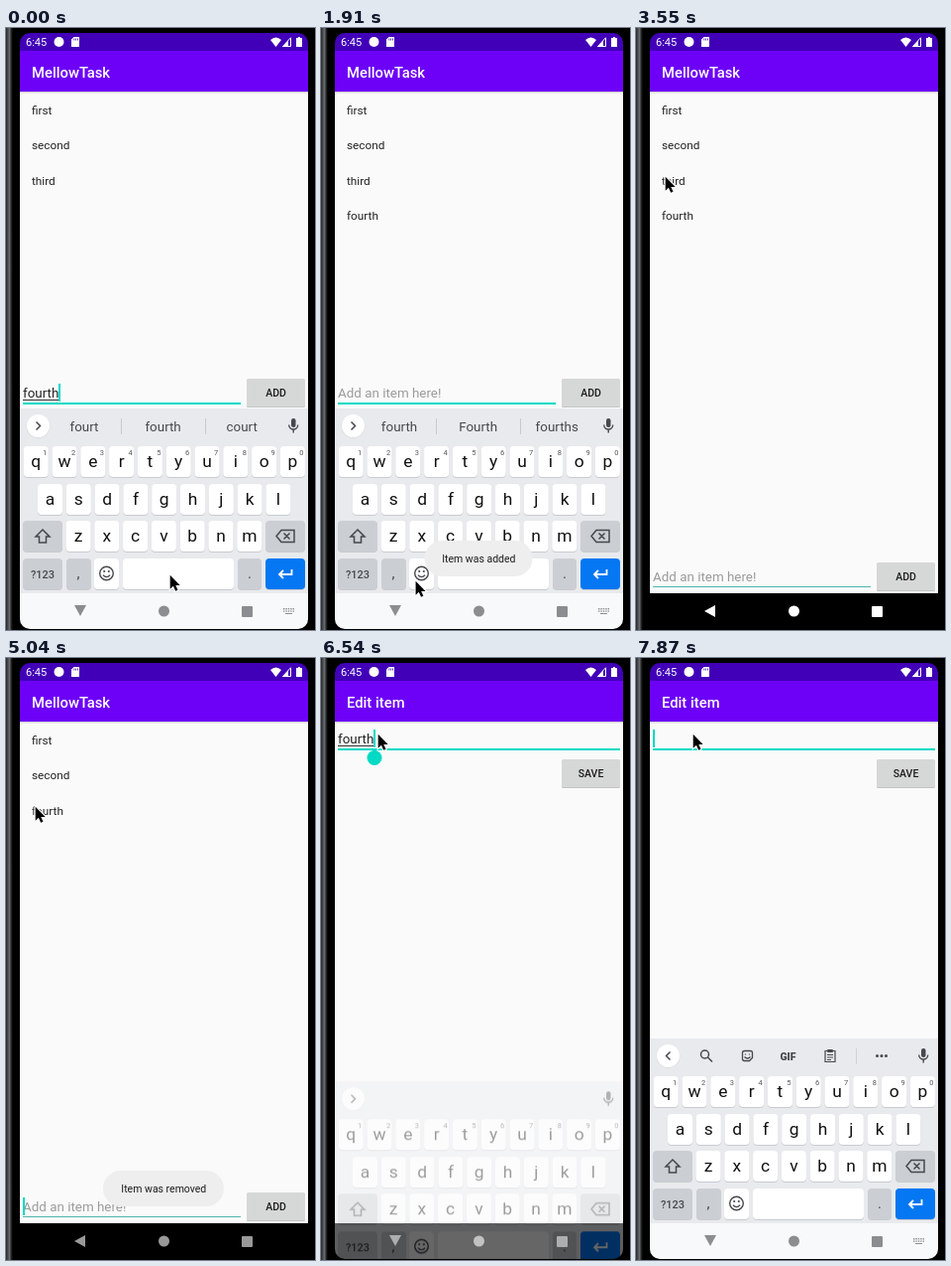
Recreate the animation shown at these times as an HTML page with a canvas. Size 312 by 606 pixels, loop 8000 ms.

```html
<!DOCTYPE html>
<html lang="en">
<head>
<meta charset="utf-8">
<title>To-do demo</title>
<style>
html, body { margin: 0; width: 312px; height: 606px; overflow: hidden; background: #000; }
canvas { display: block; width: 312px; height: 606px; }
</style>
</head>
<body>
<script>
const W = 312, H = 606, LOOP = 8000, STEP = 148.5;
const TEAL = '#03dac5', GREY = '#cbced3', INK = '#45484c';
const dpr = window.devicePixelRatio || 1;

function surface() {
  const canvas = document.createElement('canvas');
  canvas.width = W * dpr;
  canvas.height = H * dpr;
  const ctx = canvas.getContext('2d');
  ctx.scale(dpr, dpr);
  return ctx;
}
const main = surface(), buffer = surface();
document.body.append(main.canvas);
let c = main;

const clamp = v => Math.max(0, Math.min(1, v));

function box(x, y, w, h, color, r = 0) {
  c.fillStyle = color;
  c.beginPath();
  c.roundRect(x, y, w, h, r);
  c.fill();
}
function dot(x, y, r, color) {
  box(x - r, y - r, 2 * r, 2 * r, color, r);
}
function text(s, x, y, size, color = '#222', weight = 400, align = 'left') {
  c.font = `${weight} ${size}px Roboto, sans-serif`;
  c.fillStyle = color;
  c.textAlign = align;
  c.fillText(s, x, y);
  return c.measureText(s).width;
}
function fill(d, x, y, color) {
  c.save();
  c.translate(x, y);
  c.fillStyle = color;
  c.fill(new Path2D(d));
  c.restore();
}
function line(d, x, y, color, width = 1.5) {
  c.save();
  c.translate(x, y);
  c.strokeStyle = color;
  c.lineWidth = width;
  c.stroke(new Path2D(d));
  c.restore();
}
// Draws a group off screen, then blends it as one picture.
function layer(alpha, dy, draw) {
  if (alpha <= 0) return;
  buffer.clearRect(0, 0, W, H);
  c = buffer;
  draw();
  c = main;
  c.globalAlpha = alpha;
  c.drawImage(buffer.canvas, 0, dy, W, H);
  c.globalAlpha = 1;
}

function device() {
  const edge = c.createLinearGradient(0, 0, 7, 0);
  edge.addColorStop(0, '#26282a');
  edge.addColorStop(0.5, '#686b6e');
  edge.addColorStop(0.8, '#1c1d1e');
  edge.addColorStop(1, '#000');
  box(0, 0, W, H, '#000');
  box(0, 0, 7, H, edge);
}

function page(title) {
  box(14, 23, 291, 547, '#fafafa');
  box(14, 64, 291, 1, '#d4d4d6');
  box(14, 65, 291, 1, '#ececee');
  box(14, 5, 291, 18, '#4100b8');
  box(14, 23, 291, 41, '#6d00f7');
  text('6:45', 20, 18, 11, '#fff');
  dot(53.5, 14, 5, '#fff');
  fill('M2.5 0H8V10H0V2.5Z', 66, 9, '#fff');
  for (let x = 68.5; x < 73; x += 1.8) box(x, 10.5, 0.8, 2, '#4100b8');
  fill('M0 3Q5.5-2 11 3L5.5 10Z', 267, 9, '#fff');
  line('M.5 9.5L8.5 .8V9.5Z', 279, 9, '#fff', 1);
  fill('M0 10L6 3.5V10Z', 279, 9, '#fff');
  fill('M0 1H2V0H4V1H6V10H0Z', 293, 9, '#fff');
  text(title, 26, 49.7, 14.8, '#fff', 500);
}

function navBar(background, tone, down) {
  box(14, 569, 291, 37, background);
  fill(down ? 'M-6-6H6L0 5Z' : 'M5-6V6L-6 0Z', 75, 587, tone);
  dot(159.5, 587, 5.5, tone);
  box(238, 582, 11, 11, tone, 1);
}

function button(label, y, pressed) {
  box(243, y + 1, 59, 28, '#c3c5c4', 1.5);
  box(243, y, 59, 28, pressed ? '#cbcdcc' : '#d6d8d7', 1.5);
  text(label, 272.5, y + 18, 10.5, '#1c1c1c', 500, 'center');
}

function field({ value, hint, y, right, caret, active, handle }) {
  const width = value ? text(value, 17, y + 4, 13.4) : 0;
  if (!value && hint) text(hint, 17, y + 4, 13.4, '#9b9b9b');
  if (value && active) box(17, y + 6, width, 1, '#333');
  box(17, y + 9, right - 17, active ? 2 : 1, active ? TEAL : hint ? '#4fb5ae' : '#a2a2a2');
  if (caret) box(17 + Math.round(width), y - 10, 2, 18, TEAL);
  if (handle) {
    dot(54, y + 18.5, 7.5, TEAL);
    fill('M0-8.5L5-4H-5Z', 54, y + 18.5, TEAL);
  }
}

function key(x, y, w, color = '#fff') {
  box(x, y + 1, w, 31, '#c8cbcf', 4);
  box(x, y, w, 31, color, 4);
}
function letters(row, firstX, y, digits) {
  [...row].forEach((ch, i) => {
    const x = firstX + i * 28.8;
    key(x - 12.5, y, 25);
    text(ch, x, y + 20.5, 17.4, '#111', 400, 'center');
    if (digits) text((i + 1) % 10, x + 9, y + 8.5, 7.5, '#555', 400, 'center');
  });
}

function toolStrip() {
  line('M2-4L-2 0L2 4', 32.5, 400.5, INK);
  line('M3.5-1A4 4 0 1 1-4.5-1A4 4 0 1 1 3.5-1M2.5 2L7 6.5', 70, 400, INK);
  line('M-3-5H3Q5-5 5-3V2L2 5H-3Q-5 5-5 3V-3Q-5-5-3-5M-2-2V-1M2-2V-1M-3 1Q0 4 3 1', 112.5, 400.5, INK, 1.3);
  text('GIF', 153.5, 404.5, 10.5, INK, 900, 'center');
  line('M-5-5H5V6H-5ZM-3-1H3M-3 1.5H3M-3 4H1', 196, 400.5, INK, 1.2);
  box(193, 394, 6, 3, INK, 1);
  box(222, 393, 1, 16, '#cfd2d6');
  for (const x of [243.5, 248, 252.5]) dot(x, 400.5, 1.5, INK);
}

function keyboard(words) {
  const navTone = '#8b8d90';
  box(14, 383, 291, 187, '#e8eaed');
  navBar('#f8f9fa', navTone, true);
  for (let y = 0; y < 2; y++)
    for (let x = 0; x < 5; x++) box(280 + x * 2.4, 584 + y * 2.4, 1.4, 1.4, navTone);
  box(282, 589, 7, 1, navTone);

  dot(32.5, 401, 11.8, '#d5d7da');
  dot(32.5, 400.5, 11.5, '#fff');
  if (words === 'tools') toolStrip();
  else {
    line('M-2-4L2 0L-2 4', 32.5, 400.5, INK);
    if (words) {
      words.split(' ').forEach((w, i) => text(w, 79 + i * 79.6, 406, 13.4, INK, 400, 'center'));
      box(116, 393, 1, 16, '#c8cbcf');
      box(201, 393, 1, 16, '#c8cbcf');
    }
  }
  box(288, 393, 4.5, 9, INK, 2.2);
  line('M-4.5-1A4.5 4.5 0 0 0 4.5-1M0 3.5V7', 290.2, 400.5, INK, 1.4);

  letters('qwertyuiop', 30.2, 421, true);
  letters('asdfghjkl', 44.5, 459);
  letters('zxcvbnm', 73, 496);
  key(17, 496, 40, GREY);
  line('M0-7L7 0H3.5V6H-3.5V0H-7Z', 37, 512, INK);
  key(262, 496, 40, GREY);
  line('M-9 0L-4-6H9V6H-4ZM-1.5-3L4.5 3M4.5-3L-1.5 3', 282, 511.5, INK);
  key(17, 534, 40, GREY);
  text('?123', 37, 553.5, 11, INK, 500, 'center');
  key(61, 534, 25, GREY);
  text(',', 73, 554, 15, INK, 400, 'center');
  key(89, 534, 25);
  line('M6.8 0A6.8 6.8 0 1 1-6.8 0A6.8 6.8 0 1 1 6.8 0M-3.6 1.6Q0 5.6 3.6 1.6', 101.5, 549, INK, 1.4);
  dot(99.2, 547, 1.1, INK);
  dot(103.8, 547, 1.1, INK);
  key(118, 534, 112);
  key(234, 534, 24, GREY);
  text('.', 246, 554, 15, INK, 400, 'center');
  key(262, 534, 40, '#0577f2');
  line('M6.5-4V1H-5.5M-2-3L-6 1L-2 5', 282, 549, '#fff', 1.8);
}

function toast(message, halfWidth, alpha) {
  layer(alpha, 0, () => {
    box(159 - halfWidth, 516, 2 * halfWidth, 36, '#eeeeee', 18);
    text(message, 159.3, 537.5, 10.5, '#1c1c1c', 400, 'center');
  });
}

// Pointer stops: time in steps, x, y.
const stops = [[1, 165, 550], [6, 249, 367], [9, 249, 367], [14, 77, 578], [17, 77, 578],
  [23, 29, 149], [37, 29, 149], [39, 45, 106], [42, 57, 76]];
function pointer(n) {
  let i = stops.findIndex(s => s[0] > n);
  if (i < 0) i = stops.length - 1;
  const b = stops[i], a = stops[Math.max(0, i - 1)];
  const k = clamp((n - a[0]) / (b[0] - a[0] || 1)), e = k * k * (3 - 2 * k);
  const x = a[1] + (b[1] - a[1]) * e + 0.7, y = a[2] + (b[2] - a[2]) * e + 0.7;
  const arrow = 'M0 0V14L3.2 11L5.5 16L7.8 15L5.6 10.2H10Z';
  line(arrow, x, y, '#fff', 2.2);
  fill(arrow, x, y, '#000');
}

const blink = (n, start) => ((n - start) % 6.734 + 6.734) % 6.734 < 3.367;
const fade = (n, start, rise, end, fall) => Math.min(clamp((n - start) / rise), clamp((end - n) / fall));

function listPage(n, covered) {
  const added = n >= 7, typing = n <= 14;
  page('MellowTask');
  const items = ['first', 'second'];
  if (n < 29) items.push('third');
  if (added) items.push('fourth');
  items.forEach((s, i) => text(s, 26, Math.floor(87 + i * 35.6), 11.8));
  const y = typing ? 368 : 553;
  field({ value: added ? '' : 'fourth', hint: 'Add an item here!', y, right: 237,
    caret: n < 3 || blink(n, 27), active: typing });
  button('ADD', y - 15, n >= 6 && n < 10);
  const tone = Math.round(153 + 102 * fade(n, 15, 2, 34, 2));
  navBar('#000', `rgb(${tone},${tone},${tone})`, covered);
}

// Text left in the edit field and its suggestions after each deletion.
const edits = [[0, 'fourth', 'fourth Fourth fourths'], [49, 'fourt', 'fourt fourth court'],
  [50, 'four', 'four Four for'], [51, 'fou', 'fou you for'], [52, 'f', 'f for of'], [53, '', 'tools']];

function editPage(n, value, covered) {
  page('Edit item');
  const focused = n >= 43;
  field({ value, y: 82, right: 302, active: focused,
    caret: focused && (n >= 49 || blink(n, 43)), handle: focused && n < 49 });
  button('SAVE', 102);
  navBar('#000', '#999', covered);
}

function render(n) {
  const [, value, words] = edits.findLast(e => e[0] <= n);
  const opened = clamp((n - 35) / 3);
  const shown = n < 20 ? clamp(1 - (n - 14) / 2) : clamp((n - 43) / 2.5);
  const strip = n < 7 ? 'fourt fourth court' : n < 14 ? 'fourth Fourth fourths' : n < 45 ? '' : words;

  device();
  c.save();
  c.beginPath();
  c.roundRect(14, 5, 291, 600, 10);
  c.clip();
  if (opened < 1) listPage(n, shown > 0);
  layer(opened, (1 - opened) * 18, () => editPage(n, value, shown > 0));
  layer(shown, (1 - shown) * 72, () => keyboard(strip));
  toast('Item was added', 54.5, fade(n, 7.9, 2, 22, 2));
  toast('Item was removed', 61, fade(n, 29.4, 1.6, 42, 2));
  c.restore();
  pointer(n);
}

function tick(now) {
  render(Math.floor((now % LOOP + 20) / STEP));
  requestAnimationFrame(tick);
}
requestAnimationFrame(tick);
</script>
</body>
</html>
```
